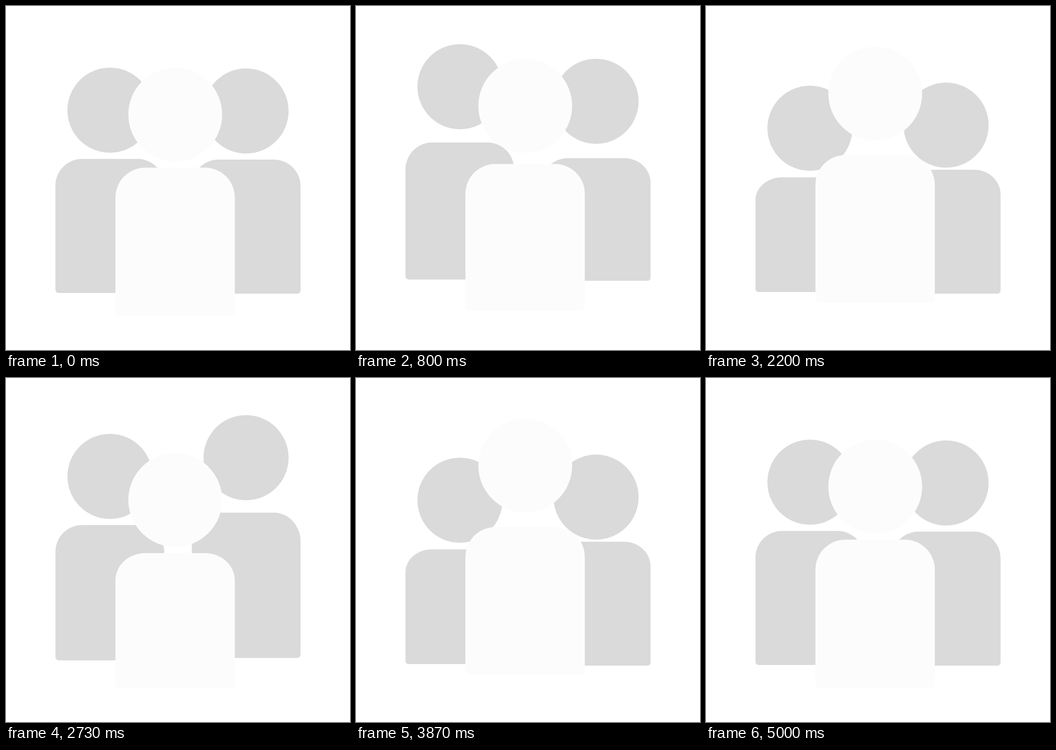
Animation, 748 px wide and 748 px high, one loop 5030 ms. Source, as an HTML page:

```html
<!DOCTYPE html>
<html lang="en">
<head>
<meta charset="utf-8">
<title>Jumping trio</title>
<style>
  html, body { margin: 0; height: 100%; overflow: hidden; background: #fff; }
  svg { display: block; width: 100%; height: 100%; }
</style>
</head>
<body>
<svg viewBox="0 0 748 748"></svg>
<script>
const LOOP = 5030, CYCLE = 50, FPS = 30;
const LIFT = 29.5, AIR = 9, LAND = 33;

// crouch and leap: [tick, head travel, chest travel]; land and air: middle tick; lag: chest behind head
const people = [
  { fill: '#dadada', cx: 226, headY: 226.5, r: 92.5, left: 107.5, right: 344, top: 332.5, foot: 624, round: 58,
    crouch: [15, 45, 41], leap: [26.3, 56, 42], land: 36.3, air: 24.7, lag: 0.7 },
  { fill: '#dadada', cx: 522, headY: 228.3, r: 92.5, left: 404, right: 640.5, top: 334, foot: 625.5, round: 58,
    crouch: [17, 33, 44], leap: [31, 57, 42], land: 40, air: 26.1, lag: 2 },
  { fill: '#fcfcfc', cx: 368, headY: 236, r: 102, left: 238, right: 497.5, top: 351.5, foot: 673, round: 65,
    crouch: [6, 40, 38], leap: [18.3, 50, 30], land: 30, air: 17, lag: 0 }
];

const svg = document.querySelector('svg');
function add(tag, attrs) {
  const el = svg.appendChild(document.createElementNS('http://www.w3.org/2000/svg', tag));
  for (const name in attrs) el.setAttribute(name, attrs[name]);
  return el;
}

for (const p of people) {
  p.body = add('path', { fill: p.fill });
  p.head = add('circle', { fill: p.fill, cx: p.cx, r: p.r });
}

// Soft rise to 1 and back, reaching half a width to each side
const bump = (t, mid, half) =>
  Math.abs(t - mid) < half ? Math.cos(Math.PI * (t - mid) / (2 * half)) ** 2 : 0;

// Crouch, leap and landing added up; part 1 is the head, part 2 the chest
const sway = ({ crouch, leap, land }, part, t) =>
  crouch[part] * bump(t, crouch[0], 6) - leap[part] * bump(t, leap[0], 12) + LAND * bump(t, land, 9);

const lift = (p, t) => LIFT * Math.max(0, 1 - ((t - p.air) / AIR) ** 2);

function bodyPath(p, top, foot) {
  const { left, right, round } = p;
  const stretch = (foot - top) / (p.foot - p.top);
  const ry = round * stretch, small = 7, sy = small * stretch;
  return `M${left} ${top + ry}A${round} ${ry} 0 0 1 ${left + round} ${top}H${right - round}`
    + `A${round} ${ry} 0 0 1 ${right} ${top + ry}V${foot - sy}`
    + `A${small} ${sy} 0 0 1 ${right - small} ${foot}H${left + small}`
    + `A${small} ${sy} 0 0 1 ${left} ${foot - sy}Z`;
}

function draw(now) {
  let tick = Math.floor(now % LOOP * FPS / 1000 + 0.1);
  if (tick % 6 === 1) tick--; // every sixth tick holds the previous pose
  const t = tick % CYCLE;
  for (const p of people) {
    p.head.setAttribute('cy', p.headY + sway(p, 1, t));
    p.body.setAttribute('d', bodyPath(p, p.top + sway(p, 2, t - p.lag), p.foot - lift(p, t)));
  }
}

const start = performance.now();
function loop() {
  draw(performance.now() - start);
  requestAnimationFrame(loop);
}
loop();
</script>
</body>
</html>
```
